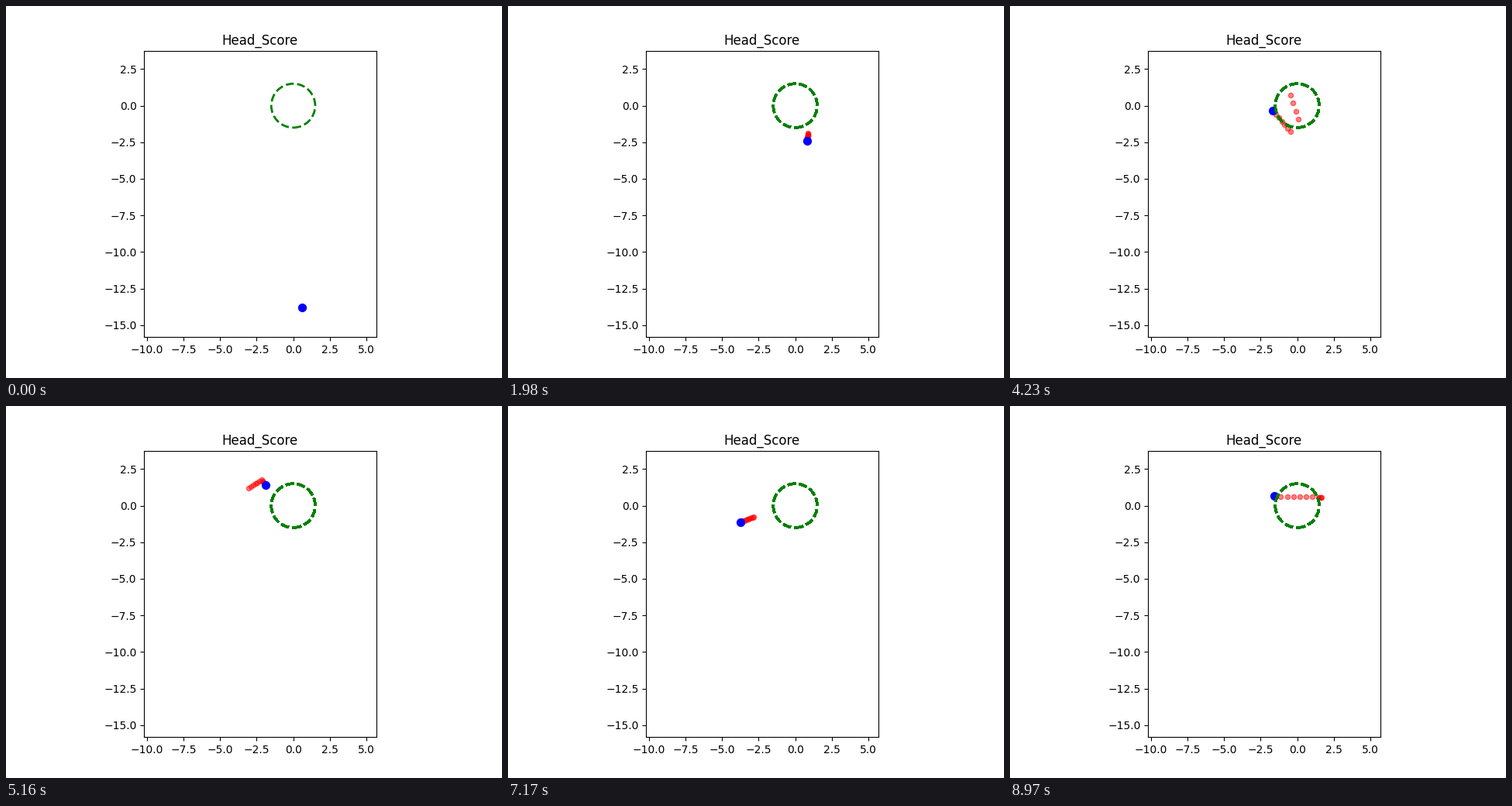
Animation of 640 by 480 pixels, one loop 9 s. Source, as a matplotlib script:

```python
import numpy as np
import matplotlib.pyplot as plt
from matplotlib.animation import FuncAnimation
from matplotlib.collections import PatchCollection
from matplotlib.patches import Circle

FRAMES, STEP = 300, 30
TAIL = 10

# turning points of the head: step, x, y
WAYPOINTS = [
    (0, 0.62, -13.81), (21, 3.4, -7.3), (32, 3.67, 0.56), (34, 3.66, 0.54),
    (39, 2.19, -0.71), (52, 0.9, -1.7), (86, 0.65, -3.4), (94, 0.6, -3.13),
    (95, 0.73, -2.58), (114, 1.45, 0), (131, -0.46, 0.72),
    (134, 0.07, -0.92), (135, -0.46, -1.77), (141, -1.65, -0.35),
    (152, -4.55, 0.3), (168, -2.15, 1.77), (195, -0.46, -0.6),
    (198, -0.4, 0.08), (205, -0.57, 0.12), (248, -4.6, -1.45),
    (259, -8.17, -2.67), (261, -8.08, -2.48), (269, -3.51, -2),
    (285, 2.14, 0.93), (289, 1.66, 0.55), (292, 1.45, 0.58),
    (299, -1.55, 0.65),
]

key, kx, ky = np.transpose(WAYPOINTS)
t = np.arange(FRAMES)
track = np.column_stack([np.interp(t, key, kx), np.interp(t, key, ky)])

fig, ax = plt.subplots(figsize=(6.4, 4.8), dpi=100)
ax.set_xlim(-10.19, 5.675)
ax.set_ylim(-15.816, 3.76)
ax.set_aspect("equal")
ax.set_title("Head_Score")

tail = ax.scatter([], [], s=20, c="red", alpha=0.5)
head = ax.scatter([], [], s=50, c="blue")
zone = Circle((0, 0), 1.5)
rings = PatchCollection([zone], facecolor="none", edgecolor="green",
                        linewidth=2, linestyle="--")
ax.add_collection(rings, autolim=False)


def update(i):
    tail.set_offsets(track[max(0, i - TAIL):i])
    head.set_offsets(track[i:i + 1])
    # the ring is stacked once per step, so its edges harden
    rings.set_paths([zone] * (i + 1))
    return tail, head, rings


anim = FuncAnimation(fig, update, frames=FRAMES, interval=STEP,
                     repeat=True, repeat_delay=0, blit=False)
plt.show()
```
